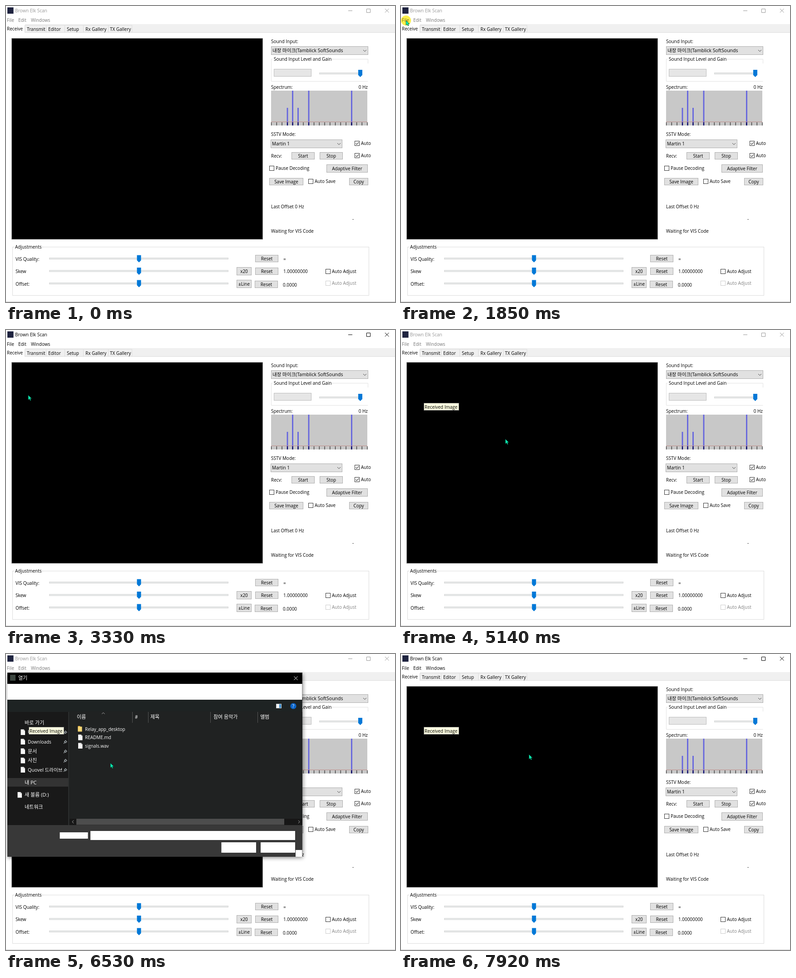
An HTML page that plays this animation: 857 px wide and 654 px high, repeating every 8000 ms.

```html
<!DOCTYPE html>
<html lang="ko">
<head>
<meta charset="utf-8">
<style>
  html, body { margin: 0; width: 100%; height: 100%; overflow: hidden; background: #fff; }
  svg { display: block; }
  text { font-family: "Open Sans", "Noto Sans", "Noto Sans CJK KR", "Noto Sans CJK", sans-serif; font-size: 9.95px; white-space: pre; }
  #halo { mix-blend-mode: multiply; }
  .bar text { fill: #777; }
  .bar .title { fill: #999; }
  .bar .ctl { stroke: #999; }
  .active text, .active .title { fill: #000; }
  .active .ctl { stroke: #000; }
</style>
</head>
<body>
<svg id="stage" width="857" height="654" viewBox="0 0 857 654"></svg>
<script>
const LOOP = 8000;

// ---- drawing helpers; y in text() is the middle of the capitals ----
const text = (x, y, s, o = {}) =>
  `<text x="${x}" y="${y + 3.6}" fill="${o.fill || '#000'}" text-anchor="${o.anchor || 'start'}"` +
  `${o.size ? ` style="font-size:${o.size}px"` : ''}${o.cls ? ` class="${o.cls}"` : ''}>${s}</text>`;
const box = (x0, y0, x1, y1, fill, extra = '') =>
  `<rect x="${x0}" y="${y0}" width="${x1 - x0}" height="${y1 - y0}" fill="${fill}" ${extra}/>`;
const frame = (x0, y0, x1, y1, fill, stroke) =>
  box(x0 + .5, y0 + .5, x1 - .5, y1 - .5, fill, `stroke="${stroke}"`);
const line = (d, stroke, w = 1, extra = '') =>
  `<path d="${d}" fill="none" stroke="${stroke}" stroke-width="${w}" ${extra}/>`;
const group = (id, body, extra = '') => `<g id="${id}" ${extra}>${body}</g>`;

const button = (x0, y0, x1, y1, s) =>
  frame(x0, y0, x1, y1, '#e1e1e1', '#adadad') +
  text((x0 + x1) / 2, (y0 + y1) / 2 + .4, s, { anchor: 'middle' });
const combo = (x0, y0, x1, y1, s, size) =>
  frame(x0, y0, x1, y1, '#e1e1e1', '#adadad') +
  text(x0 + 3, (y0 + y1) / 2 + .3, s, { size }) +
  line(`M${x1 - 11},${(y0 + y1) / 2 - 1.5}l3.5,3.5l3.5,-3.5`, '#444');
const check = (x, y, s, on, off) =>
  frame(x, y, x + 11, y + 11, '#fff', off ? '#ccc' : '#333') +
  (on ? line(`M${x + 2.5},${y + 5.5}l2.3,2.5l4,-5`, '#222', 1.1) : '') +
  text(x + 14, y + 5.5, s, { fill: off ? '#838383' : '#000' });
const thumb = (x, y) =>
  `<path d="M${x},${y}h9v11.5l-4.5,4.5l-4.5,-4.5z" fill="#0078d7"/>`;
const track = (x0, x1, y) => frame(x0, y, x1, y + 4, '#e7eaea', '#d6d6d6');

// ---- main window ----
function titleBar() {
  return text(20, 10, 'Brown Elk Scan', { size: 10, cls: 'title' }) +
    text(2, 31.5, 'File') + text(27, 31.5, 'Edit') + text(55, 31.5, 'Windows') +
    line('M754,10.5h9M794.5,6.5h8v8h-8zM835,6l8.5,8.5M843.5,6l-8.5,8.5', '#000', 1, 'class="ctl"');
}

function tabs() {
  const list = [[42, 46, 'Transmit'], [88, 93, 'Editor'], [129, 134, 'Setup'],
    [170, 175, 'Rx Gallery'], [225, 229, 'TX Gallery']];
  return box(0, 40, 857, 59, '#f0f0f0') + box(0, 40, 42, 60, '#fff') +
    line('M41.5,42.5H277.5V59M88.5,42.5V59M129.5,42.5V59M170.5,42.5V59M225.5,42.5V59M41.5,42.5V59M41.5,58.5H857', '#dcdcdc') +
    text(2, 50, 'Receive') + list.map(([, x, s]) => text(x, 51, s)).join('');
}

function spectrum() {
  let s = box(584, 187, 796, 264, '#c8c8c8');
  for (const [x, y] of [[620, 225], [631.5, 187], [643.5, 225], [667, 187], [761.5, 187]])
    s += box(x - 1.4, y, x + 1.4, 258, '#6464de');
  s += box(584, 255.5, 796, 256.5, '#c08c88');
  for (let i = 0; i <= 18; i++) {
    const x = 584.5 + i * 11.75;
    s += box(x - .6, 257, x + .7, 264, '#333');
  }
  for (const x of [620, 631.5, 643.5, 667, 761.5]) s += box(x - 1.2, 257, x + 1.2, 264, '#0a0a70');
  return s;
}

function sidePanel() {
  return text(584, 78, 'Sound Input:') +
    combo(584, 89, 798, 108, '내장 마이크(Tamblick SoftSounds', 10.5) +
    line('M797.5,127V117.5H718M587,117.5H584.5V166.5H797.5', '#e2e2e2') +
    text(590, 117.5, 'Sound Input Level and Gain') +
    frame(590, 139, 673, 156, '#e6e6e6', '#bcbcbc') +
    track(690, 780, 147) + thumb(776, 141) +
    text(584, 179.5, 'Spectrum:') + text(797, 179.5, '0 Hz', { anchor: 'end' }) +
    spectrum() +
    text(584, 283.5, 'SSTV Mode:') + combo(583, 295, 741, 314, 'Martin 1') +
    check(768, 298, 'Auto', true) + check(768, 325, 'Auto', true) +
    text(584, 331.5, 'Recv:') +
    button(629, 323, 680, 339, 'Start') + button(691, 323, 742, 339, 'Stop') +
    check(580, 353, 'Pause Decoding') + button(706, 350, 797, 368, 'Adaptive Filter') +
    button(580, 380, 655, 396, 'Save Image') + check(666, 382, 'Auto Save') +
    button(756, 380, 798, 396, 'Copy') +
    text(584, 443, 'Last Offset 0 Hz') + text(763, 470, '-') +
    text(584, 497, 'Waiting for VIS Code');
}

function adjustments() {
  const rows = [['VIS Quality:', 559], ['Skew', 586.5], ['Offset:', 614]];
  return frame(14, 532, 800, 640, 'none', '#dcdcdc') + box(18, 528, 79, 537, '#fff') +
    text(20, 532.5, 'Adjustments') +
    rows.map(([s, y]) => text(21, y, s) + track(95, 490, y - 3) + thumb(288.5, y - 8.5)).join('') +
    button(549, 550, 600, 566, 'Reset') + button(549, 578, 600, 594, 'Reset') +
    button(548, 607, 599, 623, 'Reset') +
    button(508, 577, 541, 595, 'x20') + button(508, 605, 541, 623, '±Line') +
    text(611, 559, '=') + text(611, 586.5, '1.00000000') + text(610, 616, '0.0000') +
    check(704, 581, 'Auto Adjust') + check(704, 607, 'Auto Adjust', false, true) +
    line('M0,653.5H857', '#d0d0d0');
}

// ---- File menu ----
const ROW = 16.56, MENU_TOP = 41.6;
function menu() {
  const items = [['Set Image Save Directory...'], ['Set Gallery Directory', 'Ctrl+D'],
    ['Set Gallery Category', '', 1], ['Set Categories Directory'], ['Archive Saved Images...'],
    ['Set Transmit Image Directory...'], ['Decode Audio File...', 'Ctrl+O'],
    ['Decode Audio File With Auto Start...'], ['Load Transmit Image...', 'Ctrl+T', 1],
    ['Close', 'Ctrl+W', 1], ['Exit']];
  return box(2, 44, 270, 228, '#000', 'opacity=".35" filter="url(#soft)"') +
    frame(-1, 40, 268, 226, '#f2f2f2', '#c4c4c4') +
    box(0, 0, 266, ROW, '#91c9f7', 'id="hover"') +
    items.map(([s, key, off], i) => {
      const y = MENU_TOP + ROW * (i + .5) + .3, fill = off ? '#858585' : '#000';
      return text(22, y, s, { fill }) + (key ? text(252, y, key, { fill, anchor: 'end' }) : '');
    }).join('');
}

// ---- file dialog ----
const page = (x, y) => `<path d="M${x},${y}h6.5l3,3v9.5h-9.5z" fill="#f6f6f6"/>` +
  line(`M${x + 6.5},${y}v3h3`, '#aaa', .8);
const folder = (x, y, c = '#f8d775') => box(x, y, x + 5, y + 12, '#e0ac3c') + box(x, y + 1.5, x + 9, y + 12.5, c);
const pale = (x, y, s, size = 11) => text(x, y, s, { fill: '#fff', size });

function dialogFrame() {
  return box(4, 44, 654, 450, '#000', 'opacity=".5" filter="url(#wide)"') +
    box(3, 41, 653, 448, '#202222') + box(3, 41, 653, 66, '#000') +
    box(9, 46, 21, 59, '#3c4640') + pale(27, 53, '열기') +
    line('M634.5,49.5l8,8M642.5,49.5l-8,8', '#fff') +
    box(3, 66, 653, 101, '#fff') + box(3, 101, 653, 127, '#1e2323') +
    box(3, 378, 653, 448, '#383838') +
    [[118.5, 394, 180.5, 408], [186, 391, 637, 411], [474.5, 416, 551, 439], [561, 416, 637, 439], [638, 433, 653, 448]]
      .map(b => box(...b, '#fff')).join('') +
    line('M3,41.5H652.5V448', '#555', .6);
}

const NAV = [['바탕 화면', 173], ['Downloads', 194, 9.95], ['문서', 215], ['사진', 235.5], ['Quovel 드라이브', 256, 10.6]];
function navPane() {
  const pin = y => line(`M127,${y + 4}l2.6,-2.6M128,${y - 1}l4,4M129,${y}l2,-3l3,3l-3,2`, '#a8b0b4', 1.2);
  return box(3, 128, 137, 378, '#191919') + box(137, 128, 139, 378, '#2c2e2e') +
    box(3, 274, 137, 293, '#333') + pale(41, 152, '바로 가기') +
    NAV.map(([s, y, size]) => pale(48, y, s, size)).join('') +
    box(124.5, 164, 137, 266, '#191919') + NAV.map(n => pin(n[1])).join('') +
    pale(41, 284, '내 PC') + pale(41, 311.5, '새 볼륨 (D:)') + pale(41, 338.5, '네트워크') +
    group('plain', NAV.map(n => page(32.5, n[1] - 6.5)).join('') + page(25.5, 305)) +
    group('tinted',
      `<path d="M30,146l1.8,4h4.2l-3.4,2.8l1.3,4.2l-3.9,-2.6l-3.9,2.6l1.3,-4.2l-3.4,-2.8h4.2z" fill="#3a9bea"/>` +
      NAV.map((n, i) => i ? folder(33, n[1] - 6.5) : box(32, 169, 43, 177, '#2f9be6')).join('') +
      box(24, 279, 36, 287, '#4cb4f0') + box(25, 308, 36, 314, '#b8bec4') + box(24, 334, 36, 342, '#4cb4f0'));
}

function fileList() {
  return box(139, 128, 653, 378, '#202222') +
    frame(595, 110, 607, 120, '#f2f2f2', '#c8d0d4') + box(602, 111, 606, 119, '#3f8ecb') +
    `<circle cx="633" cy="115" r="6.6" fill="#0b64c8"/>` + text(633, 115, '?', { fill: '#fff', anchor: 'middle' }) +
    line('M278.5,128V152M313.5,128V152M450.5,128V152M554.5,128V152', '#555') +
    line('M211,132.5l3.3,-3l3.3,3', '#aaa') +
    pale(156, 139.5, '이름') + pale(284, 139.5, '#', 9.95) + pale(318, 139.5, '제목') +
    pale(457, 139.5, '참여 음악가') + pale(560, 139.5, '앨범') +
    box(145, 194, 640, 212, '#4d4d4d', 'id="picked"') +
    folder(158.5, 159) + page(159, 178) + page(159, 196.5) +
    pale(174, 166, 'Relay_app_desktop', 9.95) + pale(174, 184.5, 'README.md', 9.95) +
    pale(174, 203, 'signals.wav', 9.95) +
    box(140, 364, 653, 378, '#171717') + box(155, 364, 613, 377.5, '#4d4d4d') +
    line('M149,367.5l-3,3.3l3,3.3M644,367.5l3,3.3l-3,3.3', '#aaa');
}

document.getElementById('stage').innerHTML =
  `<defs><filter id="soft"><feGaussianBlur stdDeviation="1.5"/></filter>
   <filter id="wide"><feGaussianBlur stdDeviation="5"/></filter></defs>` +
  box(0, 0, 857, 654, '#fff') + box(3, 3, 16.5, 17, '#1f2440') +
  box(0, 24, 21, 40, '#cce8ff', 'id="fileLit"') +
  group('bar', titleBar(), 'class="bar"') + tabs() +
  frame(12, 71, 566, 516, '#000', '#8a8a8a') + sidePanel() + adjustments() +
  `<circle id="halo" r="11" fill="#fbf04a"/>` +
  group('menu', menu()) +
  group('dialog', dialogFrame() + group('nav', navPane()) + group('files', fileList())) +
  group('tip', frame(50, 161, 128, 178, '#ffffe1', '#666') + text(52, 170, 'Received Image')) +
  `<path id="cursor" d="M0,0V10.4L2.5,8.3L4.3,12L6,11.2L4.3,7.6H7.6Z" fill="#0cf2b4" stroke="#063a2c" stroke-width=".7"/>`;

// ---- motion: start, end, steps, destination ----
const MOVES = [
  [130, 270, 3, 400, 488], [420, 650, 4, 241, 382], [820, 1610, 11, 16, 50],
  [1680, 1760, 2, 11, 32], [2310, 2620, 5, 24, 65], [2700, 2930, 4, 49, 144],
  [3560, 3720, 3, 230, 241], [4190, 4190, 1, 225, 232], [4420, 4420, 1, 226, 234],
  [5140, 5140, 1, 230, 241], [6850, 7230, 6, 230, 198], [7850, 7920, 2, 282, 222]
];
const MENU_FADE = [[0, 0], [2000, .6], [2080, 1], [3240, .4], [3330, 0]];
const DIALOG_FADE = [[0, 0], [5680, 1], [7460, .7], [7540, .3], [7620, 0]];

const held = (table, t) => table.reduce((v, [at, next]) => t >= at ? next : v, 0);
const ease = p => p * p * (3 - 2 * p);

function pointer(t) {
  let x = 676, y = 562;
  for (const [t0, t1, n, tx, ty] of MOVES) {
    if (t < t0) break;
    const gap = (t1 - t0) / (n - 1 || 1) || 1;
    const k = Math.min(n, Math.floor((t - t0) / gap + .01) + 1);
    const p = ease(k / n);
    x += (tx - x) * p;
    y += (ty - y) * p;
  }
  return [x, y];
}

const el = id => document.getElementById(id);
const show = (id, v) => el(id).setAttribute('opacity', +v);
const place = (id, x, y) => el(id).setAttribute('transform', `translate(${x} ${y})`);

function render(t) {
  const [x, y] = pointer(t);
  for (const id of ['cursor', 'halo']) {
    place(id, x, y);
    show(id, t >= 70);
  }
  el('bar').setAttribute('class', t >= 1920 && t < 3490 || t >= 7690 ? 'bar active' : 'bar');
  show('fileLit', t >= 1920 && t < 3240);
  show('menu', held(MENU_FADE, t));
  const row = Math.floor((y - MENU_TOP) / ROW);
  show('hover', row >= 0);
  place('hover', 0, MENU_TOP + row * ROW);
  show('tip', t >= 3490);
  show('dialog', held(DIALOG_FADE, t));
  show('nav', t >= 6150);
  show('files', t >= 6530);
  show('plain', t < 6680);
  show('tinted', t >= 6680);
  show('picked', y > 190 && y < 212);
  el('picked').setAttribute('fill', t >= 7310 ? '#777' : '#4d4d4d');
}

const began = performance.now();
(function tick() {
  render((performance.now() - began) % LOOP);
  requestAnimationFrame(tick);
})();
</script>
</body>
</html>
```
